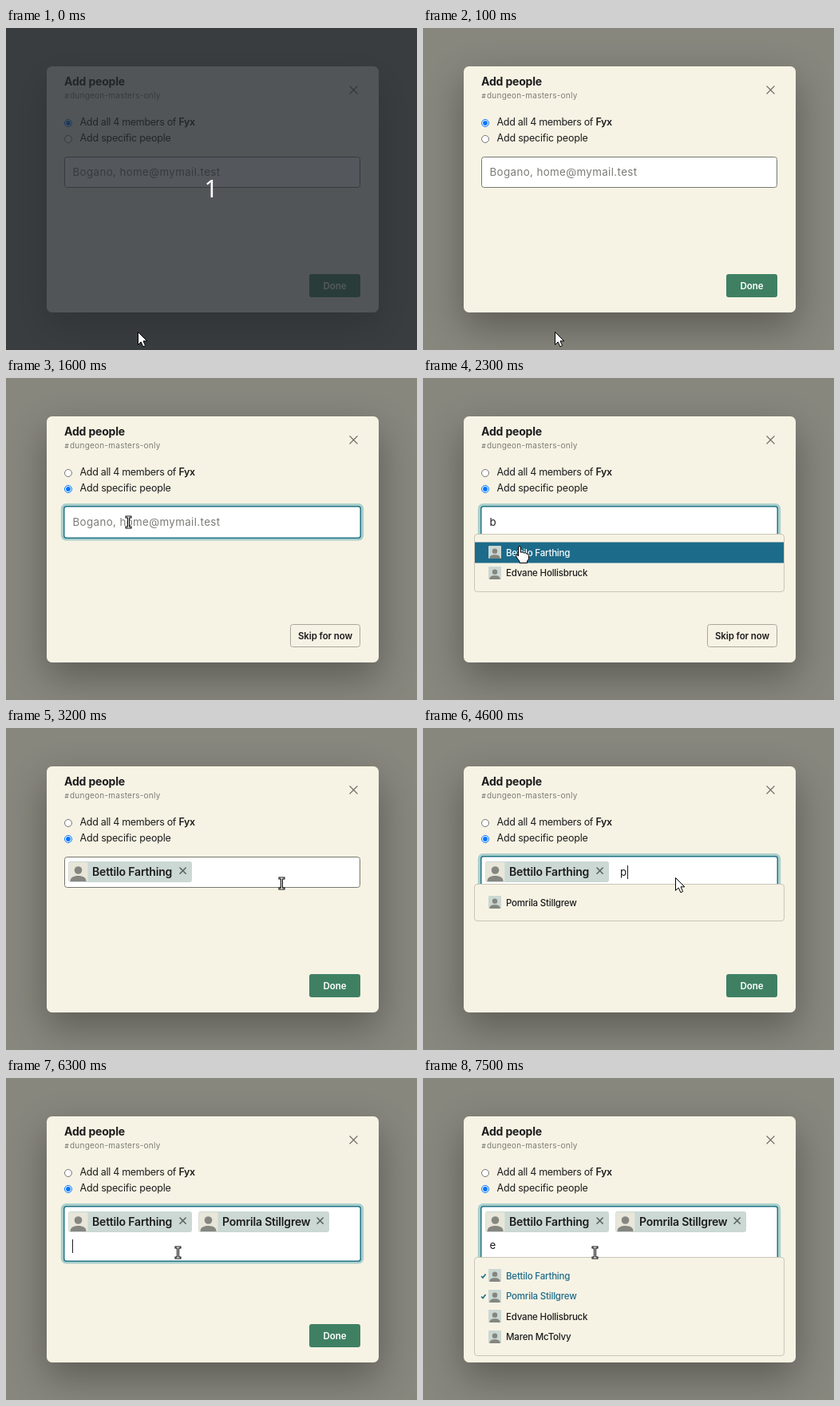
Animation, 515 px wide and 403 px high, one loop 8000 ms. Source, as an HTML page:

```html
<!DOCTYPE html>
<html lang="en">
<head>
<meta charset="utf-8">
<title>Add people</title>
<style>
  html, body { margin: 0; width: 100%; height: 100%; overflow: hidden; background: #88877e; }
  #modal {
    position: absolute; left: 51px; top: 48px; width: 416px; height: 308px;
    border-radius: 6.5px; background: #f7f3e4; box-shadow: 0 18px 48px rgba(0, 0, 0, .33);
  }
  svg { position: absolute; left: 0; top: 0; display: block; font-family: Inter, sans-serif; }
</style>
</head>
<body>
<div id="modal"></div>
<svg id="stage" width="515" height="403" viewBox="0 0 515 403"></svg>
<script>
const INK = '#1d1c1d', PAPER = '#f7f3e4', TEAL = '#1d6b8a', MIST = '#cbd8d3', GREY = '#7b7b76';
const LOOP = 8000;
const PEOPLE = ['Bettilo Farthing', 'Pomrila Stillgrew', 'Edvane Hollisbruck', 'Maren McTolvy'];
const TOKENS = [
  { x: 78, w: 155, name: PEOPLE[0] },
  { x: 241, w: 164, name: PEOPLE[1] }
];

const text = (x, y, size, str, { fill = INK, weight = 400, gap = 0, more = '' } = {}) =>
  `<text x="${x}" y="${y}" font-size="${size}" font-weight="${weight}" fill="${fill}" letter-spacing="${gap}" ${more}>${str}</text>`;

const rect = (x, y, w, h, r, fill, stroke = 'none', width = 1) =>
  `<rect x="${x}" y="${y}" width="${w}" height="${h}" rx="${r}" fill="${fill}" stroke="${stroke}" stroke-width="${width}"/>`;

const cross = (x, y, r, width, color) =>
  `<path d="M${x - r} ${y - r}l${2 * r} ${2 * r}m0 ${-2 * r}l${-2 * r} ${2 * r}" fill="none" stroke="${color}" stroke-width="${width}" stroke-linecap="round"/>`;

const caret = (x, y) => rect(x, y, 1, 17, 0, INK);

function avatar(x, y, size, fill) {
  return `<g transform="translate(${x} ${y}) scale(${size / 24})">${rect(0, 0, 24, 24, 1.5, fill)}
    <circle cx="12" cy="10" r="4.8" fill="#858680"/>
    <path d="M2 24C2 19 6 17 12 17S22 19 22 24Z" fill="#858680"/></g>`;
}

function radio(y, on) {
  const dot = on ? `<circle cx="78" cy="${y}" r="2.9" fill="#0075ff"/>` : '';
  return `<circle cx="78" cy="${y}" r="4.5" fill="#fff" stroke="${on ? '#0075ff' : '#767676'}"/>${dot}`;
}

function field({ focus, tokens }) {
  const bottom = tokens > 1 ? 228.5 : 199.5;
  if (!focus) return rect(73.5, 161.5, 370, bottom - 161.5, 3, '#fff', '#77786f');
  return rect(68.8, 157, 379.4, bottom - 153, 6.5, '#a9cfcc') +
    rect(72.75, 160.75, 371.5, bottom - 160, 3, '#fff', '#237486', 1.5);
}

function token({ x, w, name }) {
  return rect(x, 167, w, 26, 3, MIST) + avatar(x + .5, 168, 24, '#e7e6d9') +
    text(x + 30, 185, 14, name, { weight: 600, gap: -.18 }) +
    cross(x + w - 11.4, 178.6, 3.6, 1.6, '#5d625f');
}

function menu({ rows, hover, tokens }) {
  if (!rows.length) return '';
  const top = tokens > 1 ? 224.5 : 195.5;
  const step = 25.5;
  let out = rect(64.5, top, 388, Math.round(46 + step * (rows.length - 1)), 3.5, PAPER, '#c9c6b7');
  rows.forEach((id, i) => {
    const y = top + 23 + i * step;
    const lit = hover && i === 0, picked = id < tokens;
    if (lit) out += rect(65, y - 13, 387, 26, 0, TEAL);
    if (picked) out += `<path d="M73 ${y + .5}l2 2 3.5-4.5" fill="none" stroke="${TEAL}" stroke-width="1.6"/>`;
    out += avatar(82, Math.floor(y - 8), 16, MIST) +
      text(104, y + 4, 11.5, PEOPLE[id], { weight: 500, gap: -.2, fill: lit ? '#fff' : picked ? TEAL : INK });
  });
  return out;
}

function button(skip) {
  const style = { weight: 600, more: 'text-anchor="middle"' };
  return skip
    ? rect(356.5, 308.5, 87, 28, 3, PAPER, '#a9a89c') + text(400, 327, 11.5, 'Skip for now', { ...style, gap: -.1 })
    : rect(380, 308, 64, 29, 3, '#3f8063') + text(412, 327, 11.5, 'Done', { ...style, fill: '#fff' });
}

const POINTERS = {
  arrow: '<path d="M.5.5V16.4L4.2 12.9 6.8 18.8 9.6 17.6 7 11.8H11.8Z" fill="#fff" stroke="#000"/>',
  beam: ['#000" stroke-width="3', '#fff" stroke-width="1'].map(s =>
    `<path d="M-2.5-6.5H2.5M0-6.5V6.5M-2.5 6.5H2.5" fill="none" stroke-linecap="square" stroke="${s}"/>`).join(''),
  hand: `<path d="M-1.5 2Q-1.5.5 0 .5T1.5 2V8.2Q4.5 7 5.2 9 8 8 8.6 10 11.5 9.5 11.5 12.5V15.5Q11 18 9.5 19V21.5H0V19.5Q-1.8 17.5-4.3 13.2-5 11.2-3.2 11.2L-1.5 13Z"
    fill="#fff" stroke="#000"/>`
};

// The beam is centred on a pixel so that its thin core stays sharp.
function pointer({ at: [x, y], pointer }) {
  const shift = pointer === 'beam' ? .5 : 0;
  return `<g transform="translate(${Math.floor(x) + shift} ${Math.floor(y) + shift})">${POINTERS[pointer]}</g>`;
}

const start = {
  dim: true, some: false, focus: false, skip: false, hint: true, tokens: 0,
  rows: [], hover: false, typed: '', caret: 0, at: [165, 380], pointer: 'arrow'
};

// Each step changes the state that came before it.
const STEPS = [
  [0, {}],
  [100, { dim: false }],
  [300, { at: [167, 362] }],
  [400, { at: [168, 338] }],
  [600, { at: [163, 300] }],
  [700, { at: [157, 240] }],
  [800, { at: [154, 193], pointer: 'beam' }],
  [900, { at: [153, 180] }],
  [1100, { some: true, focus: true, skip: true, caret: 83 }],
  [1600, { caret: 0 }],
  [1700, { hint: false, typed: 'b', rows: [0, 2], caret: 93 }],
  [1900, { at: [148, 187], pointer: 'arrow' }],
  [2000, { at: [137, 206], pointer: 'hand', hover: true }],
  [2100, { at: [127, 209] }],
  [2200, { at: [122, 210], caret: 0 }],
  [2300, { at: [121, 210] }],
  [2500, { at: [121, 212], tokens: 1, focus: false, skip: false, typed: '', rows: [], hover: false }],
  [2800, { at: [205, 214], pointer: 'arrow' }],
  [2900, { at: [305, 203] }],
  [3000, { at: [345, 195], pointer: 'beam' }],
  [3200, { at: [345, 194] }],
  [3300, { at: [338, 193] }],
  [3400, { at: [326, 191] }],
  [3500, { at: [319, 190] }],
  [3700, { focus: true, caret: 247 }],
  [4200, { caret: 0 }],
  [4500, { typed: 'p', caret: 256 }],
  [4600, { rows: [1], at: [316, 187], pointer: 'arrow' }],
  [4800, { at: [275, 219], pointer: 'hand', hover: true }],
  [5000, { at: [273, 223], caret: 0 }],
  [5100, { at: [267, 221] }],
  [5400, { at: [266, 221] }],
  [5500, { at: [265, 221] }],
  [5700, { at: [265, 223], pointer: 'beam', tokens: 2, focus: false, typed: '', rows: [], hover: false }],
  [5900, { at: [255, 222] }],
  [6000, { at: [238, 220] }],
  [6100, { at: [224, 218] }],
  [6200, { at: [215, 218] }],
  [6300, { focus: true, caret: 83 }],
  [6900, { typed: 'e', rows: [0, 1, 2, 3], caret: 91 }],
  [7500, { caret: 0 }]
];

let last = start;
const states = STEPS.map(([, change]) => last = { ...last, ...change });

const heading =
  text(73, 72, 14, 'Add people', { weight: 700, gap: -.18 }) +
  text(73.5, 88, 8, '#', { fill: GREY, weight: 600 }) +
  text(80, 88, 10, 'dungeon-masters-only', { fill: GREY, gap: .24 }) +
  cross(435.5, 77.5, 4.6, 1.3, '#66665f') +
  text(92.5, 122, 12.5, 'Add all 4 members of <tspan font-weight="600">Fyx</tspan>', { gap: -.3 }) +
  text(92.5, 142, 12.5, 'Add specific people', { gap: -.2 });

const curtain = rect(0, 0, 515, 403, 0, 'rgba(36,40,47,.775)') +
  text(257, 212, 30, '1', { fill: '#fff', more: 'text-anchor="middle" font-family="Noto Sans, sans-serif"' });

function draw(s) {
  const second = s.tokens > 1;
  const inputX = s.tokens === 1 ? 247 : 83.5;
  return heading + radio(119, !s.some) + radio(139, s.some) + button(s.skip) + field(s) +
    (s.hint ? text(83.5, 185, 13.3, 'Bogano, home@mymail.test', { fill: GREY, gap: .4 }) : '') +
    TOKENS.slice(0, s.tokens).map(token).join('') +
    text(inputX, second ? 214 : 185, 13.3, s.typed) +
    (s.caret ? caret(s.caret, second ? 202 : 172) : '') +
    menu(s) + (s.dim ? curtain : '') + pointer(s);
}

const stage = document.getElementById('stage');
const begin = performance.now();
let shown = -1;

function tick() {
  const t = (performance.now() - begin) % LOOP;
  const i = STEPS.findLastIndex(([at]) => at <= t);
  if (i !== shown) stage.innerHTML = draw(states[shown = i]);
  requestAnimationFrame(tick);
}
tick();
</script>
</body>
</html>
```
